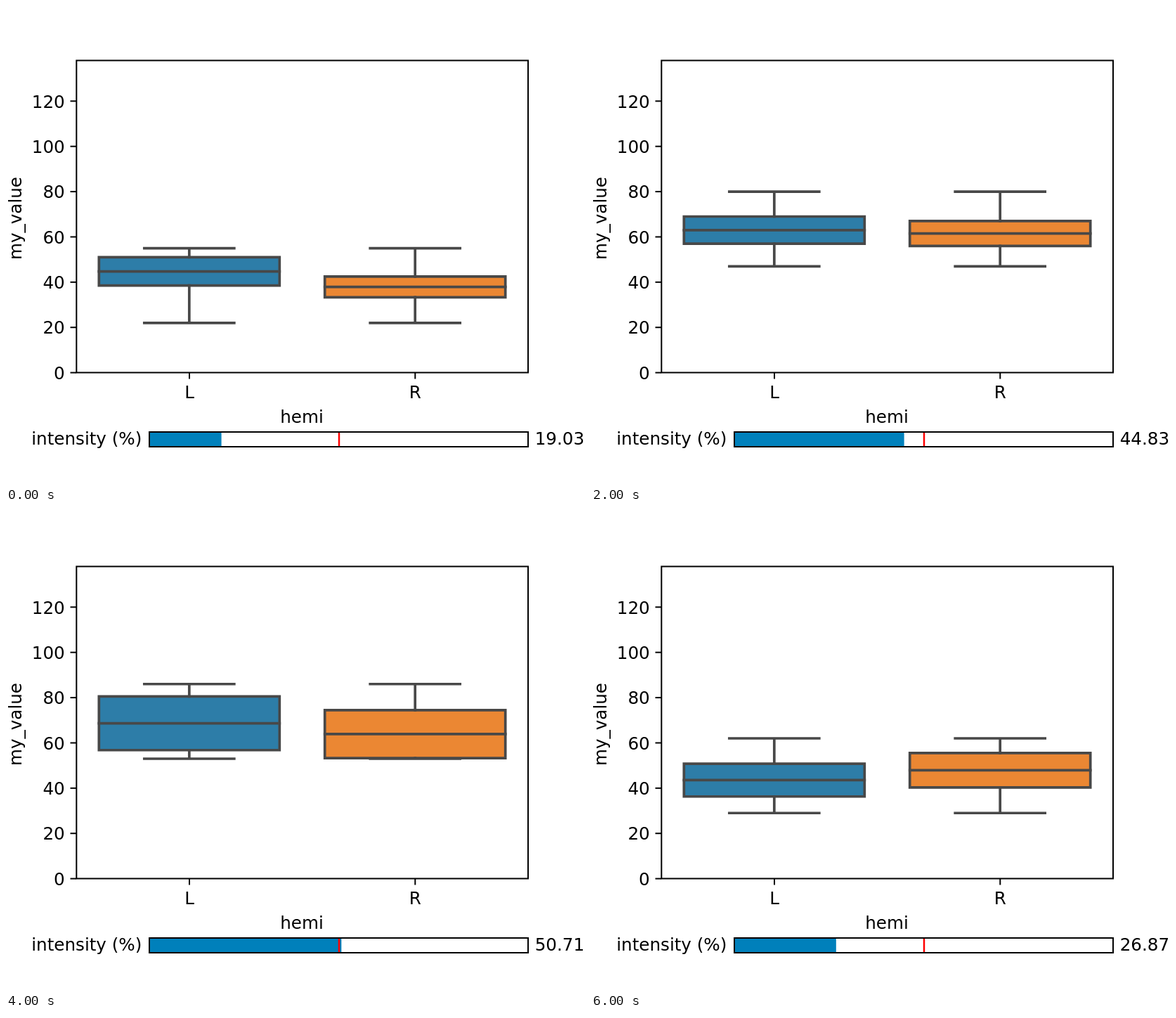
These frames come from a looping animation (824 by 680 pixels, 7000 ms). An HTML page:

```html
<!DOCTYPE html>
<html>
<head>
<meta charset="utf-8">
<style>
  html, body { margin: 0; width: 100%; height: 100%; overflow: hidden; background: #fff; }
  svg { display: block; }
  text { font: 24.6px "DejaVu Sans", sans-serif; }
  .axis { fill: none; stroke: #000; stroke-width: 2; }
  .box { stroke: #484848; stroke-width: 3.7; stroke-linecap: square; }
</style>
</head>
<body>
<svg width="824" height="680" viewBox="0 0 824 680">
  <g id="boxes"></g>
  <path class="axis" d="M100.3 77.5H743V521.5H100.3ZM261 522v8.5M582.3 522v8.5"/>
  <g id="ticks"></g>
  <g text-anchor="middle">
    <text x="261" y="557.5">L</text>
    <text x="582.3" y="557.5">R</text>
    <text x="421" y="592.5">hemi</text>
    <text transform="translate(22 302) rotate(-90)">my_value</text>
  </g>
  <text x="193.3" y="624" text-anchor="end">intensity (%)</text>
  <rect id="fill" x="204" y="606" height="21" fill="#0080bb"/>
  <path d="M474 606V627" stroke="#f00" stroke-width="2.5"/>
  <rect class="axis" x="204" y="606" width="539" height="21"/>
  <text id="value" x="752.7" y="624"></text>
</svg>
<script>
const $ = id => document.getElementById(id);
const toY = v => 521.6 - 3.219 * v;

// Intensity, then the lower and upper quartile of L and of R
const steps = [
  [19.03, 38.5, 51, 33.3, 42.5],
  [69.00, 76, 99.8, 78.5, 99.8],
  [44.83, 57, 69, 56, 67],
  [38.13, 48, 65, 47.8, 61],
  [50.71, 56.8, 80.5, 53.3, 74.5],
  [54.79, 66.3, 80.3, 60.3, 79],
  [26.87, 36.3, 50.8, 40.3, 55.5],
];

// Values spread over a fixed range above the intensity; the median sits mid-box
function boxPlot(intensity, q1, q3, center, color) {
  const base = Math.floor(intensity);
  const [min, low, mid, high, max] = [base + 3, q1, (q1 + q3) / 2, q3, base + 36].map(toY);
  const line = (y, half) => `M${center - half} ${y}h${2 * half}`;
  return `<g class="box">
    <path fill="${color}" d="${line(high, 128.5)}V${low}h-257Z"/>
    <path d="M${center} ${high}V${max}M${center} ${low}V${min}${line(max, 64)}${line(min, 64)}${line(mid, 128.5)}"/>
  </g>`;
}

for (let v = 0; v <= 120; v += 20) {
  const y = toY(v);
  $("ticks").innerHTML += `<path class="axis" d="M100 ${y}h-8.5"/>
    <text x="83.7" y="${y + 9.2}" text-anchor="end">${v}</text>`;
}

let shown = -1;
function draw(now) {
  const index = Math.floor(now / 1000) % steps.length;
  if (index !== shown) {
    shown = index;
    const [intensity, l1, l3, r1, r3] = steps[index];
    $("boxes").innerHTML = boxPlot(intensity, l1, l3, 260.8, "#2d7da8") + boxPlot(intensity, r1, r3, 582.2, "#eb8733");
    $("fill").setAttribute("width", 5.39 * intensity);
    $("value").textContent = intensity.toFixed(2);
  }
}

const start = performance.now();
function tick() {
  draw(performance.now() - start);
  requestAnimationFrame(tick);
}
tick();
</script>
</body>
</html>
```
